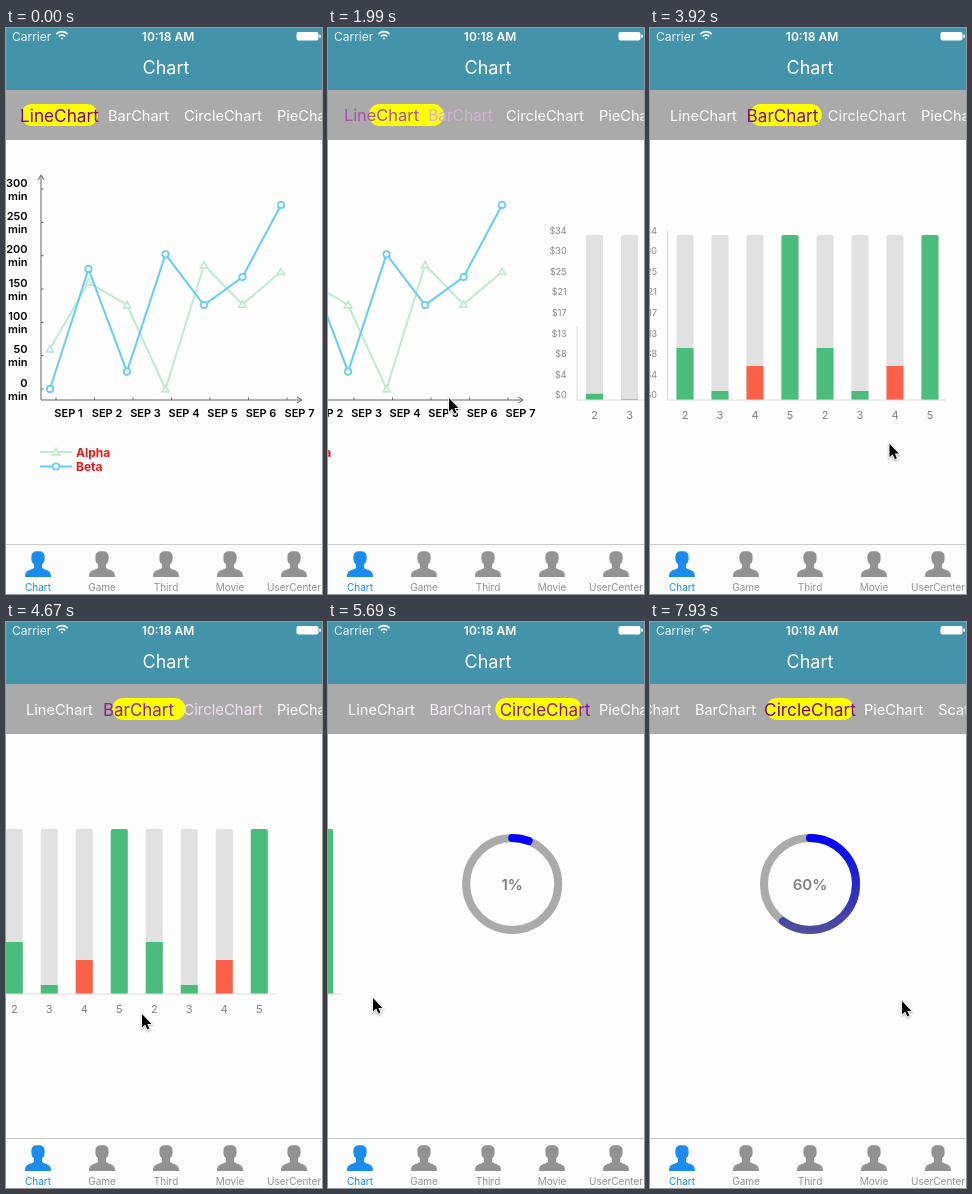
Animation, 316 px wide and 566 px high, one loop 8 s. Source, as an HTML page with a canvas:

```html
<!DOCTYPE html>
<html lang="en">
<head>
<meta charset="utf-8">
<title>Chart pager</title>
<style>
html, body { margin: 0; width: 100%; height: 100%; overflow: hidden; background: #fdfdfd; }
canvas { display: block; }
</style>
</head>
<body>
<canvas id="stage" width="316" height="566"></canvas>
<script>
const ctx = document.getElementById('stage').getContext('2d');
const LOOP = 8000, FIRST_TICK = 500, TICK = 148.5; // the screen refreshes once per tick
const PAGE = 320, SLOP = 15, SETTLE = 374;
const BARS_START = 1770, RING_START = 5505;
const GREEN = '#4abc7b', RED = '#fb6048', GRAY = '#aaaaaa', PAPER = '#fdfdfd';

const clamp = v => Math.max(0, Math.min(1, v));
const mix = (a, b, p) => a + (b - a) * p;
const smooth = p => p * p * (3 - 2 * p);
const progress = (time, start, duration) => clamp((time - start) / duration);

// Pointer rests: time, x, y. It eases from each one to the next.
const rests = [
  [500, 285, 399], [1540, 237, 425], [2250, 68, 345], [2730, 222, 407], [3030, 201, 401],
  [3330, 267, 422], [3700, 267, 422], [4430, 136, 392], [4670, 136, 392], [5050, 228, 409],
  [5418, 45, 376], [5840, 45, 376], [6580, 169, 371], [7330, 169, 371], [7930, 252, 379]
];
const swipes = [
  { grab: 1540, release: 2250, from: 0, to: 1 },
  { grab: 3700, release: 4430, from: 1, to: 1 },
  { grab: 5050, release: 5418, from: 1, to: 2 }
];
const stripStart = swipes[2].release + SETTLE;

function pointerAt(time) {
  const i = Math.max(1, rests.findIndex(r => r[0] >= time));
  const [t0, x0, y0] = rests[i - 1], [t1, x1, y1] = rests[i];
  const p = smooth(progress(time, t0, t1 - t0));
  return [mix(x0, x1, p), mix(y0, y1, p)];
}

// The page follows the pointer while held, then settles on a whole page.
function pageOffset(time) {
  const swipe = swipes.findLast(s => time >= s.grab);
  if (!swipe) return 0;
  const { grab, release, from, to } = swipe;
  const pulled = pointerAt(grab)[0] - SLOP - pointerAt(Math.min(time, release))[0];
  const held = from * PAGE + Math.max(0, pulled);
  return mix(held, to * PAGE, smooth(progress(time, release, SETTLE)));
}

function text(str, x, y, size, color, align = 'left', weight = 400) {
  ctx.font = `${weight} ${size}px Inter, sans-serif`;
  ctx.textAlign = align;
  ctx.fillStyle = color;
  ctx.fillText(str, x, y);
}

function rect(x, y, w, h, color, radius = 0) {
  ctx.fillStyle = color;
  ctx.beginPath();
  ctx.roundRect(x, y, w, h, radius);
  ctx.fill();
}

function line(points, color, width = 1) {
  ctx.strokeStyle = color;
  ctx.lineWidth = width;
  ctx.beginPath();
  points.forEach(p => ctx.lineTo(...p));
  ctx.stroke();
}

function arc(x, y, radius, from, to, color, width) {
  ctx.strokeStyle = color;
  ctx.lineWidth = width;
  ctx.beginPath();
  ctx.arc(x, y, radius, from * Math.PI, to * Math.PI);
  ctx.stroke();
}

function at(x, y, draw) {
  ctx.save();
  ctx.translate(x, y);
  draw();
  ctx.restore();
}

// Line chart
const triangle = new Path2D('M0 -3.5 L3.5 2.8 H-3.5 Z');
const circle = new Path2D();
circle.arc(0, 0, 3.2, 0, Math.PI * 2);

const series = [
  { name: 'Alpha', color: '#bfead0', shape: triangle, minutes: [60, 160, 126, 0, 186, 127, 176] },
  { name: 'Beta', color: '#66ccfa', shape: circle, minutes: [0, 180, 26, 202, 126, 168, 276] }
];

function drawSeries(points, { color, shape }) {
  line(points, color, 2);
  points.forEach(([x, y]) => at(x, y, () => {
    ctx.fillStyle = PAPER;
    ctx.fill(shape);
    ctx.lineWidth = 1.7;
    ctx.stroke(shape);
  }));
}

function drawLineChart() {
  const axis = '#666', step = 38.5;
  line([[35, 147], [35, 372], [296, 372]], axis);
  line([[32, 152], [35, 147], [38, 152]], axis);
  line([[291, 369], [296, 372], [291, 375]], axis);
  for (let i = 0; i < 7; i++) {
    const y = 361 - i * 33.33, x = 50 + i * step;
    line([[35, y], [37.5, y]], axis);
    line([[x, 369.5], [x, 372]], axis);
    text(i * 50, 21.5, y - 2.5, 11, '#000', 'right', 600);
    text('min', 21.5, y + 10.5, 11, '#000', 'right', 600);
    text('SEP ' + (i + 1), x + 12.5, 388.5, 11, '#000', 'center', 600);
  }
  series.forEach((s, i) => {
    const y = 424 + i * 14.5;
    drawSeries(s.minutes.map((m, day) => [44 + day * step, 361 - m * 2 / 3]), s);
    line([[34, y], [66, y]], s.color, 2);
    drawSeries([[50, y]], s);
    text(s.name, 70, y + 4.5, 12, '#f01414', 'left', 700);
  });
}

// Bar chart
function drawBarChart(time) {
  const axisGrow = progress(time, BARS_START, 500);
  const barGrow = smooth(progress(time, BARS_START, 1000));
  for (let i = 0; i <= 8; i++) {
    const value = Math.ceil(34 * (1 - i / 8) - 0.5);
    text('$' + value, 19.5, 205.5 + i * 20.6, 9, '#858585', 'right');
  }
  for (let i = 0; i < 8; i++) {
    const x = 39 + i * 35, height = [52, 9, 34, 165][i % 4] * barGrow;
    rect(x, 207, 17, 165, '#e1e1e1', [2, 2, 0, 0]);
    rect(x, 372 - height, 17, height, i % 4 === 2 ? RED : GREEN, i % 4 === 3 ? [2, 2, 0, 0] : 0);
    text(2 + i % 4, x + 8.5, 391, 11, '#808080', 'center');
  }
  line([[30, 372], [30, 372 - 170 * axisGrow]], '#dcdcdc');
  line([[30, 372], [30 + 279 * axisGrow, 372]], '#dcdcdc');
}

// Ring chart
function drawRingChart(time) {
  const p = progress(time, RING_START, 1000);
  const count = p < 0.5 ? 4 * p ** 3 : 1 - 4 * (1 - p) ** 3;
  const blue = ctx.createLinearGradient(0, 212, 0, 312);
  blue.addColorStop(0, '#0000ff');
  blue.addColorStop(1, '#505098');
  ctx.lineCap = 'round';
  arc(160, 262, 46, 0, 2, GRAY, 8);
  if (p > 0) arc(160, 262, 46, -0.5, -0.5 + 1.2 * smooth(p), blue, 8);
  text(Math.floor(60 * count) + '%', 160, 267.5, 15, '#808080', 'center', 600);
}

// Header and category strip
function drawHeader() {
  rect(0, 0, 316, 62, '#4393ab');
  text('Carrier', 6, 12.5, 12, '#eef5f8');
  text('10:18 AM', 162, 12.5, 12, '#fff', 'center', 600);
  text('Chart', 160, 46, 18, '#fff', 'center');
  for (const radius of [1, 4.4, 7.8]) arc(56, 11.5, radius, -0.76, -0.24, '#fff', 1.7);
  rect(290.5, 4, 22, 8.5, '#fff', 2);
  rect(313.3, 6.5, 1.5, 3.5, '#fff', 1);
}

// Names stand side by side, each as wide as its text.
const LABEL_SIZE = 14.6;
ctx.font = `${LABEL_SIZE}px Inter, sans-serif`;
let nextX = 20;
const categories = ['LineChart', 'BarChart', 'CircleChart', 'PieChart', 'ScatterChart'].map(name => {
  const w = ctx.measureText(name).width, x = nextX;
  nextX += w + 15;
  return { name, x, w };
});

function drawStrip(page, time) {
  rect(0, 62, 316, 50, GRAY);
  const i = Math.floor(page), p = page - i;
  const a = categories[i], b = categories[i + 1];
  const centered = categories[2].x + categories[2].w / 2 - PAGE / 2;
  at(-centered * smooth(progress(time, stripStart, SETTLE)), 0, () => {
    rect(mix(a.x, b.x, p) - 5, 76, mix(a.w, b.w, p) + 10, 22, '#ffff00', 11);
    categories.forEach(({ name, x, w }, index) => {
      const focus = clamp(1 - Math.abs(page - index));
      const redBlue = mix(255, 128, focus), green = mix(255, 0, focus);
      at(x + w / 2, 87.6, () => {
        const scale = mix(1, 1.18, focus);
        ctx.scale(scale, scale);
        text(name, 0, 5.2, LABEL_SIZE, `rgb(${redBlue}, ${green}, ${redBlue})`, 'center');
      });
    });
  });
}

// Tab bar
const person = new Path2D('M-13 549 C-13 542 -9 543 -4 540 V534 H4 V540 C9 543 13 542 13 549 Z');
person.roundRect(-6.6, 523.3, 13.2, 14.5, [5, 5, 6.6, 6.6]);

function drawTabs() {
  rect(0, 516, 316, 50, '#fcfcfc');
  rect(0, 516, 316, 1, '#cacaca');
  ['Chart', 'Game', 'Third', 'Movie', 'UserCenter'].forEach((name, i) => {
    const color = i ? '#929292' : '#1a8ceb';
    at(32 + i * 64, 0, () => {
      ctx.fillStyle = color;
      ctx.fill(person);
      text(name, 0, 562.5, 10, color, 'center');
    });
  });
}

const arrow = new Path2D('M0 0 V13.5 L3.2 10.6 L5.4 15.5 L7.4 14.6 L5.3 9.9 H9.4 Z');

function drawPointer(x, y) {
  at(x, y, () => {
    ctx.shadowColor = 'rgba(0, 0, 0, 0.35)';
    ctx.shadowBlur = 2;
    ctx.shadowOffsetY = 1;
    ctx.strokeStyle = '#fff';
    ctx.lineWidth = 1.8;
    ctx.stroke(arrow);
    ctx.shadowColor = 'transparent';
    ctx.fillStyle = '#000';
    ctx.fill(arrow);
  });
}

function render(now) {
  const tick = Math.floor((now % LOOP - FIRST_TICK) / TICK + 0.1);
  const time = FIRST_TICK + tick * TICK;
  const offset = pageOffset(time);
  rect(0, 0, 316, 566, PAPER);
  [drawLineChart, drawBarChart, drawRingChart].forEach((draw, i) => {
    const x = i * PAGE - offset;
    if (Math.abs(x) < PAGE) at(x, 0, () => draw(time));
  });
  drawStrip(offset / PAGE, time);
  drawHeader();
  drawTabs();
  if (tick >= 0) drawPointer(...pointerAt(time));
  requestAnimationFrame(() => render(performance.now() - start));
}

const start = performance.now();
render(0);
</script>
</body>
</html>
```
